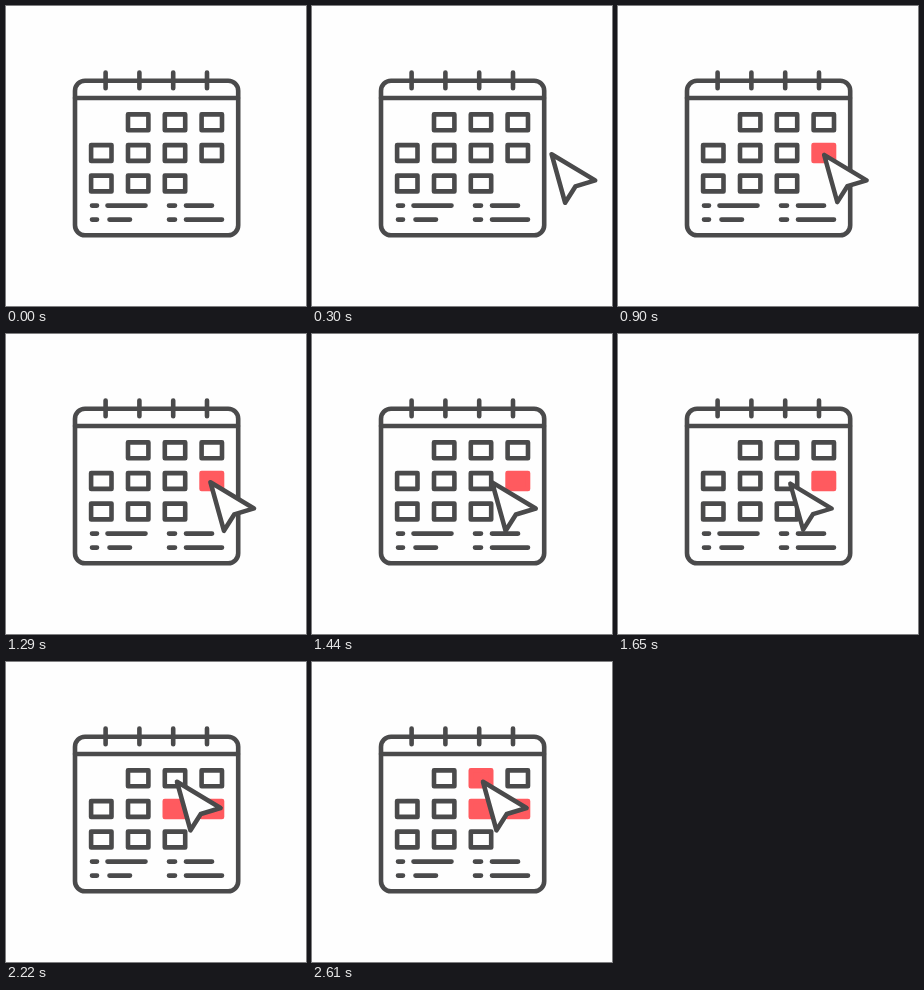
An HTML page that plays this animation: 300x300 px, repeating every 2700 ms.

```html
<!DOCTYPE html>
<html lang="en">
<head>
<meta charset="utf-8">
<title>Calendar picker</title>
<style>
  html, body { margin: 0; width: 100%; height: 100%; overflow: hidden; background: #fefefe; }
  svg { display: block; width: 100vw; height: 100vh; }
  .ink { fill: none; stroke: #4a4a4b; stroke-width: 4.6; stroke-linecap: round; stroke-linejoin: round; }
  .picked { fill: #ff5a5f; stroke: #ff5a5f; }
  #cursor { fill: #fefefe; }
</style>
</head>
<body>
<svg viewBox="0 0 300 300">
  <g class="ink" stroke-width="5">
    <rect x="69" y="74.7" width="163.2" height="154.6" rx="10"/>
    <path d="M69 92H232M99.6 66.6V82.2M133.4 66.6V82.2M167.2 66.6V82.2M201 66.6V82.2"/>
  </g>
  <path class="ink" d="M86 199.6h5M101.5 199.6H139.5M163 199.6h6M180 199.6H206
    M86 213.6h5M103.5 213.6H124M163 213.6h6M180 213.6H216"/>
  <g id="cells"></g>
  <path id="cursor" class="ink" d="M0 0L43.6 26.2L23.8 32.2L13.5 48.5Z"/>
</svg>
<script>
const LOOP = 2700, STEP = 30;
const COLS = [95.3, 132.2, 169, 205.8];
const ROWS = [116.3, 147, 177.5];
const DAYS = ['01', '02', '03', '10', '11', '12', '13', '20', '21', '22'];
const MID = { x: 21.8, y: 24.2 };

// Tip positions, with the span of each move between them
const START = { x: 239.6, y: 148.2 };
const MOVES = [
  { from: 300, to: 570, x: 205.6, y: 148.2 },
  { from: 1260, to: 1530, x: 171.2, y: 148.4 },
  { from: 1950, to: 2220, x: 171, y: 119.8 }
];
const CLICKS = [
  { from: 720, to: 960, day: '13' },
  { from: 1530, to: 1800, day: '12' },
  { from: 2220, to: 2490, day: '02' }
];

const cursor = document.getElementById('cursor');
const cells = {};
for (const day of DAYS) {
  const rect = document.createElementNS('http://www.w3.org/2000/svg', 'rect');
  const attrs = { x: COLS[day[1]] - 10.2, y: ROWS[day[0]] - 7.9, width: 20.4, height: 15.8 };
  for (const name in attrs) rect.setAttribute(name, attrs[name]);
  document.getElementById('cells').append(rect);
  cells[day] = rect;
}

const progress = (t, from, to) => Math.min(1, Math.max(0, (t - from) / (to - from)));
const ease = p => p * p * (3 - 2 * p);

function draw(t) {
  let { x, y } = START;
  for (const move of MOVES) {
    const p = ease(progress(t, move.from, move.to));
    x += (move.x - x) * p;
    y += (move.y - y) * p;
  }

  let scale = 1;
  for (const day of DAYS) cells[day].setAttribute('class', 'ink');
  for (const click of CLICKS) {
    const p = progress(t, click.from, click.to);
    scale -= 0.05 * ease(1 - Math.abs(2 * p - 1));
    if (p >= 0.5) cells[click.day].setAttribute('class', 'ink picked');
  }

  cursor.setAttribute('transform',
    `translate(${x + MID.x} ${y + MID.y}) scale(${scale}) translate(${-MID.x} ${-MID.y})`);
  cursor.setAttribute('opacity', progress(t, 30, 300));
}

const begin = performance.now();
function tick() {
  const t = (performance.now() - begin) % LOOP;
  draw(Math.floor(t / STEP) * STEP);
  requestAnimationFrame(tick);
}
tick();
</script>
</body>
</html>
```
